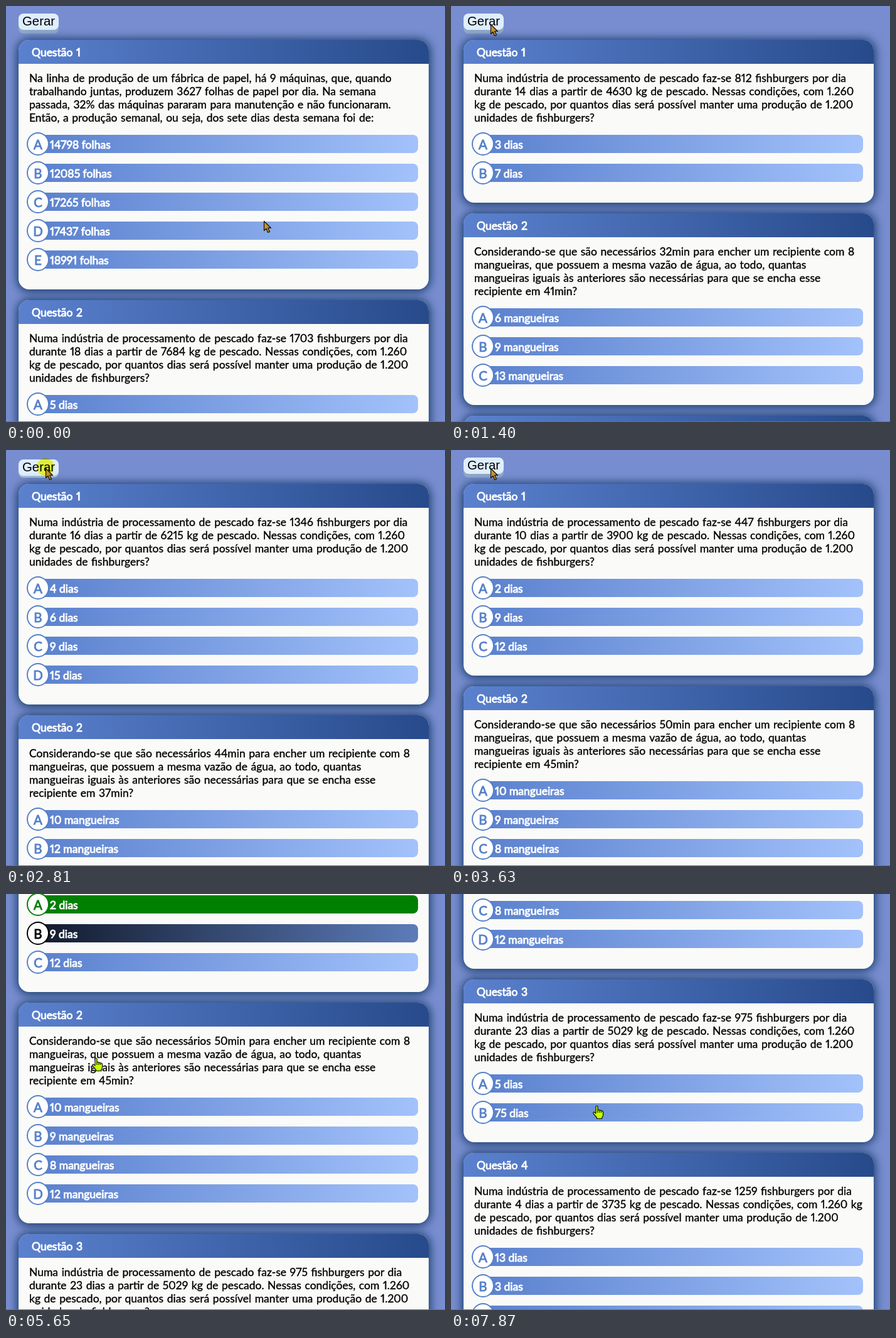
These frames come from a looping animation (700 px wide and 662 px high, 8000 ms). An HTML page:

```html
<!DOCTYPE html>
<html lang="pt">
<head>
<meta charset="utf-8">
<style>
html, body { margin: 0; width: 100%; height: 100%; overflow: hidden; background: #788dcf; }
body { font: 17.5px/21px Lato, "Open Sans", sans-serif; font-variant-numeric: proportional-nums; word-spacing: 1.1px; white-space: nowrap; }
#stage { position: absolute; width: 700px; height: 662px; overflow: hidden; background: #788dcf; }
#stage::after { content: ""; position: absolute; left: 0; top: 661px; width: 700px; height: 1px; background: #5d6ea9; }
#page, #cursor, #glow { position: absolute; left: 0; top: 0; }
#button { position: absolute; left: 20px; top: 12px; width: 64px; height: 26px; border-radius: 8px; background: #dfeefe;
  box-shadow: 0 6px #8fabc8; font: 20.4px/25px "Liberation Sans", Arial, sans-serif; text-align: center; }
#button.down { top: 15px; box-shadow: 0 3px #a9c3db; }
.card { position: absolute; left: 20px; width: 654px; border-radius: 17px; background: #fafaf9; box-shadow: 0 1px 15px 2px #103763; }
.head { height: 38px; padding-left: 21px; border-radius: 17px 17px 0 0; background: linear-gradient(90deg, #5b81ce, #274a8b);
  color: #fff; line-height: 39px; -webkit-text-stroke: .9px; }
.text { position: absolute; left: 17px; top: 50px; color: #000; -webkit-text-stroke: .35px; }
.bar { position: absolute; left: 30px; width: 587px; height: 29px; padding-left: 20px; border-radius: 8px;
  background: linear-gradient(90deg, #5b81ce, #a3c2fb); color: #fff; line-height: 31px; word-spacing: 0; -webkit-text-stroke: .9px; }
.bar b { position: absolute; left: -17px; top: -4px; width: 32px; height: 33px; border: 2px solid #5580c9; border-radius: 50%;
  background: #fff; color: #5580c9; font: 20.5px/34px Lato, "Open Sans", sans-serif; text-align: center; }
.right { background: #008000; }
.wrong { background: linear-gradient(90deg, #121a2d, #5c7cba); }
.right b { color: #008000; border-color: #008000; }
.wrong b { color: #000; border-color: #000; }
#glow { width: 28px; height: 28px; margin: -16px 0 0 -14px; border-radius: 50%; background: #ffff3c; mix-blend-mode: multiply; }
#cursor { overflow: visible; }
#cursor path { stroke: #111; stroke-width: 1.2; stroke-linejoin: round; }
</style>
</head>
<body>
<div id="stage">
  <div id="page"></div>
  <svg id="cursor" width="24" height="26">
    <path id="arrow" fill="#c8932f" d="M.5 .5V15.5L4 12.2L6.7 18.5L9.5 17.3L6.8 11.2H11.5Z"/>
    <path id="hand" fill="#c6ff00" d="M5 13V2.2Q6.5-.2 8 2.2V8Q9.6 6.5 11 8.4Q12.6 7.4 13.8 9.2Q16 8.4 16.6 11V15.5Q16.4 18 14.6 20V21.5H6.5V20L1 13.5Q.3 10.8 2.7 11.2ZM8 8V12M11 8.6V12M13.8 9.4V12"/>
  </svg>
  <div id="glow"></div>
</div>
<script>
const $ = id => document.getElementById(id);

// Each question: [text lines, options]
const question = (text, unit, values) => [text.split("|").join("<br>"), values.map(v => `${v} ${unit}`)];
const paper = (machines, sheets, percent, ...values) => question(
  `Na linha de produção de um fábrica de papel, há ${machines} máquinas, que, quando|trabalhando juntas, produzem ${sheets} folhas de papel por dia. Na semana|passada, ${percent}% das máquinas pararam para manutenção e não funcionaram.|Então, a produção semanal, ou seja, dos sete dias desta semana foi de:`,
  "folhas", values);
const fish = (burgers, days, kilos, ...values) => question(
  `Numa indústria de processamento de pescado faz-se ${burgers} fishburgers por dia|durante ${days} dias a partir de ${kilos} kg de pescado. Nessas condições, com 1.260${days < 10 ? " kg|" : "|kg "}de pescado, por quantos dias será possível manter uma produção de 1.200|unidades de fishburgers?`,
  "dias", values);
const hoses = (before, after, ...values) => question(
  `Considerando-se que são necessários ${before}min para encher um recipiente com 8|mangueiras, que possuem a mesma vazão de água, ao todo, quantas|mangueiras iguais às anteriores são necessárias para que se encha esse|recipiente em ${after}min?`,
  "mangueiras", values);

const quizzes = [
  [paper(9, 3627, 32, 14798, 12085, 17265, 17437, 18991), fish(1703, 18, 7684, 5, 8, 11)],
  [hoses(29, 39, 7, 6, 17, 11), paper(38, 15694, 4, 106518, 116010, 105465)],
  [fish(812, 14, 4630, 3, 7), hoses(32, 41, 6, 9, 13), paper(12, 5120, 25, 26880)],
  [paper(17, 8398, 35, 32752, 38593, 42032, 38211, 26748), paper(22, 2398, 61, 7201, 6547, 8104)],
  [fish(1346, 16, 6215, 4, 6, 9, 15), hoses(44, 37, 10, 12, 8)],
  [hoses(36, 48, 6, 9, 5, 14, 11), fish(958, 21, 5472, 4, 7, 10)],
  [fish(447, 10, 3900, 2, 9, 12), hoses(50, 45, 10, 9, 8, 12), fish(975, 23, 5029, 5, 75), fish(1259, 4, 3735, 13, 3, 2, 8)]
];

// State changes, each added to the state before it
const steps = [
  [0, { quiz: 0, x: 411, y: 342, down: 0, glow: 0, hand: 0, scroll: 0, answered: 0 }],
  [200, { x: 330, y: 270 }],
  [400, { x: 205, y: 152 }],
  [590, { x: 90, y: 46 }],
  [790, { x: 63, y: 29, quiz: 1 }],
  [1210, { down: 1, glow: 1 }],
  [1400, { down: 0, glow: 0, quiz: 2 }],
  [1800, { quiz: 3 }],
  [2220, { down: 1, glow: 1 }],
  [2410, { down: 0, glow: 0, quiz: 4 }],
  [2810, { down: 1, glow: 1 }],
  [3020, { down: 0, glow: 0, quiz: 5 }],
  [3630, { quiz: 6 }],
  [4430, { x: 92, y: 112 }],
  [4640, { x: 137, y: 260, hand: 1 }],
  [4840, { glow: 1, answered: 1 }],
  [5040, { glow: 0 }],
  [5440, { scroll: 100 }],
  [5650, { scroll: 203 }],
  [5840, { x: 172, y: 283 }],
  [6050, { x: 214, y: 318 }],
  [6260, { x: 241, y: 334 }],
  [6650, { glow: 1, answered: 2 }],
  [6860, { glow: 0 }],
  [7260, { scroll: 608 }],
  [7870, { x: 226, y: 336 }]
];
const marks = [["right", "wrong"], ["wrong", "right"]];

function pageHtml({ quiz, down, answered }) {
  let top = 54;
  return `<div id="button" class="${down ? "down" : ""}">Gerar</div>` + quizzes[quiz].map(([text, options], q) => {
    const height = 167 + 46 * options.length;
    const bars = options.map((option, i) =>
      `<div class="bar ${q < answered && marks[q][i] || ""}" style="top:${151 + 46 * i}px"><b>${"ABCDE"[i]}</b>${option}</div>`);
    const html = `<div class="card" style="top:${top}px;height:${height}px"><div class="head">Questão ${q + 1}</div><div class="text">${text}</div>${bars.join("")}</div>`;
    top += height + 17;
    return html;
  }).join("");
}

let shown = -1;
function draw(now) {
  const t = now % 8000;
  const count = steps.filter(([start]) => start <= t).length;
  if (count !== shown) {
    shown = count;
    const s = Object.assign({}, ...steps.slice(0, count).map(step => step[1]));
    $("page").innerHTML = pageHtml(s);
    $("page").style.transform = `translateY(${-s.scroll}px)`;
    $("cursor").style.transform = `translate(${s.x}px, ${s.y}px)`;
    $("glow").style.transform = `translate(${s.x + 6 * s.hand}px, ${s.y}px)`;
    $("glow").style.display = s.glow ? "" : "none";
    $("arrow").style.display = s.hand ? "none" : "";
    $("hand").style.display = s.hand ? "" : "none";
  }
  requestAnimationFrame(draw);
}
draw(0);
</script>
</body>
</html>
```
